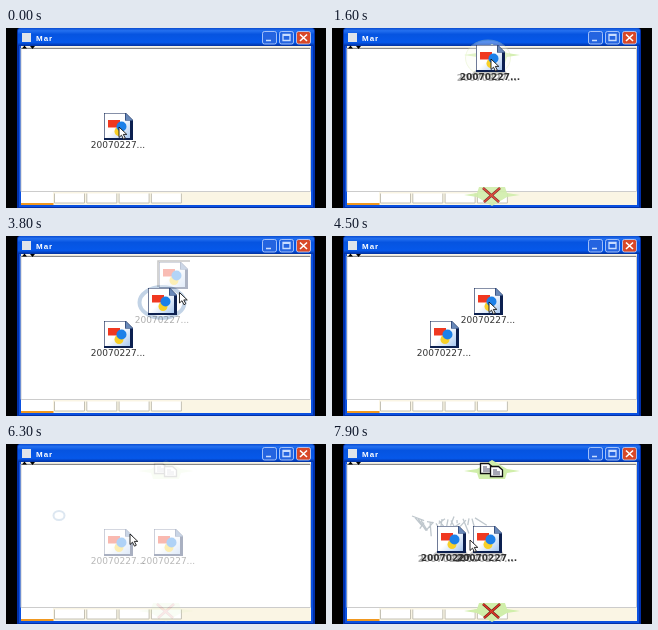
Animation of 320 by 180 pixels, one loop 8 s. Source, as an HTML page:

```html
<!DOCTYPE html>
<html lang="en">
<head>
<meta charset="utf-8">
<title>Drag and drop</title>
<style>
html, body { margin: 0; height: 100%; overflow: hidden; background: #000; }
svg { display: block; width: 100vw; height: 100vh; }
.label { font: 9px "DejaVu Sans", sans-serif; text-anchor: middle; fill: #333; }
.drag .label { font-weight: bold; }
.shadow { opacity: 0; }
.drag .shadow { opacity: .4; }
</style>
</head>
<body>
<svg viewBox="0 0 320 180">
  <defs>
    <linearGradient id="bar" x2="0" y2="1">
      <stop offset="0" stop-color="#0a4cd0"/>
      <stop offset=".15" stop-color="#2470f0"/>
      <stop offset=".35" stop-color="#0654e0"/>
      <stop offset=".8" stop-color="#0658ea"/>
      <stop offset="1" stop-color="#0230a0"/>
    </linearGradient>
    <linearGradient id="paper" x2="1" y2="1">
      <stop offset=".5" stop-color="#fff"/>
      <stop offset="1" stop-color="#a8c8f0"/>
    </linearGradient>
    <g id="file">
      <path d="M98 85h22l7 7v20H98z" fill="#0c2050"/>
      <path d="M98.6 85.6h20.4v7h5v17.400H98.600z" fill="url(#paper)"/>
      <path d="M119.500 85l7.500 7.500h-7.500z" fill="#6888b8"/>
      <circle cx="113" cy="103.500" r="4.500" fill="#f8d028"/>
      <path d="M102 92h12v7.500h-12z" fill="#f03820"/>
      <circle cx="115.500" cy="98.500" r="5" fill="#1c80e8"/>
    </g>
    <g id="page">
      <path d="M.5.5h8l4 3.500v6.500H.5z" fill="#fff" stroke="#111" stroke-width="1.300"/>
      <path d="M3 4h4M3 6h7M3 8h7" stroke="#224" stroke-width=".8"/>
    </g>
    <path id="arrow" d="M160 16l15 9 13 2-13 2-2 6h-26l-2-6-13-2 13-2z" fill="#d0eeaa"/>
    <path id="cross" d="M151 160l16 14m1-14l-16 14"/>
  </defs>

  <path d="M11 180V3q0-3 3-3h292q3 0 3 3v177z" fill="#0230a8"/>
  <path d="M13 18h294v161H13z" fill="#0a50e0"/>
  <path d="M12 18V3q0-3 3-3h290q3 0 3 3v15z" fill="url(#bar)"/>
  <rect x="16" y="5" width="9" height="9" fill="#dfe4ea"/>
  <text x="30" y="12.500" fill="#fff" font-family="Liberation Sans, sans-serif" font-size="8" font-weight="bold" letter-spacing="1">Mar</text>
  <g stroke="#c4d8ff" stroke-width=".8" fill="#2464e0">
    <rect x="256.500" y="3.500" width="14" height="12.500" rx="2"/>
    <rect x="273.500" y="3.500" width="14" height="12.500" rx="2"/>
    <rect x="290.500" y="3.500" width="14" height="12.500" rx="2" fill="#d84828"/>
  </g>
  <path d="M260 12.500h5M277 6.500h7v6h-7zM277 7.300h7" fill="none" stroke="#c8dcff" stroke-width="1.300"/>
  <path d="M294 6.500l7 6.500m0-6.500l-7 6.500" stroke="#fff" stroke-width="1.600"/>
  <path d="M15 18h290v159H15z" fill="#faf5e4"/>
  <path d="M15 20h289.500v143.500H15z" fill="#fff" stroke="#ccc"/>
  <path d="M15 20.500h289" stroke="#888"/>
  <path d="M16 20.500l2.500-3 2.500 3zM24 18h5l-2.500 3z"/>
  <g id="tabs" fill="#fff" stroke="#c4c1b4"></g>
  <path d="M15 164h32v12H15z" fill="#fff"/>
  <path d="M15 176h32.500" stroke="#f09820" stroke-width="2"/>

  <g id="guides">
    <use href="#arrow"/>
    <use href="#arrow" transform="matrix(1 0 0 -1 0 194)"/>
    <use href="#page" x="148" y="19"/>
    <use href="#page" x="158" y="22"/>
    <use href="#cross" stroke="#701818" stroke-width="2.600"/>
    <use href="#cross" stroke="#e03828" stroke-width="1.400"/>
  </g>
  <path id="trail" fill="none" stroke="#a4b0b8" stroke-width="1.300"/>
  <ellipse id="halo" fill="#fbfdf2" stroke="#d4e8a4" rx="22.500" ry="18"/>
  <ellipse id="ring" fill="none" stroke="#bccfe4"/>
  <g id="ghost" transform="translate(55 -59)">
    <path d="M97 110V84h32" fill="none" stroke="#555" stroke-width="1.500"/>
    <use href="#file"/>
  </g>
  <g id="first"></g>
  <g id="second"></g>
  <path id="cursor" d="M0 0v10.500l2.500-2.300 2 4 1.800-1-2-3.800h3.500z" fill="#fff" stroke="#111" stroke-width=".9"/>
</svg>
<script>
const LOOP = 8000, STEP = 100;
const $ = id => document.getElementById(id);
const set = (id, attrs) => Object.entries(attrs).forEach(([k, v]) => $(id).setAttribute(k, v));

for (let i = 0; i < 4; i++) {
  $("tabs").innerHTML += `<path d="M${48.5 + i * 32.3} 165.500v9.500h30v-9.500"/>`;
}
for (const id of ["first", "second"]) {
  $(id).innerHTML = `
    <text class="label shadow" x="109" y="121">20070227...</text>
    <path class="shadow" d="M92 115l6-5h29l3 5z" fill="#777"/>
    <use href="#file"/>
    <text class="label" x="112" y="120">20070227...</text>`;
}

// Scribble left behind the group drag
let seed = 7;
const random = () => (seed = seed * 16807 % 2147483647) / 2147483647;
const strokes = Array.from({ length: 22 }, (_, i) =>
  `M${80 + i * 3} ${72 + random() * 8}l${random() * 24 - 10} ${random() * 16}`);
$("trail").setAttribute("d", strokes.join(""));

const ramp = (t, from, to) => Math.min(1, Math.max(0, (t - from) / (to - from)));
const pulse = (t, on, off, rise = 200, fall = 300) =>
  ramp(t, on, on + rise) * (1 - ramp(t, off, off + fall));

// Offsets from the first icon's resting place
const HOME = [0, 0], COPY = [46, -68], PASTE = [44, -33], BESIDE = [50, 0];
const GRIP = [113, 99], LASSO = [-59, -28];

// Each move is [start, end, target, x power, y power].
const travel = (t, start, ...moves) => moves.reduce(([x, y], [from, to, target, px = 1, py = 1]) => {
  const p = ramp(t, from, to);
  return [x + (target[0] - x) * p ** px, y + (target[1] - y) * p ** py];
}, start);

const LIFT = [300, 1400, COPY, 1.8, 4], PLACE = [4500, 5200, BESIDE];

function draw(t) {
  const first = travel(t, HOME, LIFT, [1800, 2200, HOME], [7300, 7900, [7, -3]]);
  const second = travel(t, [55, -60], [3600, 3800, PASTE], PLACE, [7300, 7900, [43, -3]]);
  const [cx, cy] = travel(t, HOME, LIFT, [1800, 2300, [84, -56]], [2800, 4500, PASTE], PLACE,
    [5500, 5950, LASSO], [5950, 6300, [11, -9]], [6300, 7300, [25, 0]], [7300, 7900, [25, -3]]);
  set("cursor", { transform: `translate(${cx + GRIP[0]} ${cy + GRIP[1]})` });

  const blink = 1 - .65 * pulse(t, 5900, 6300, 400, 400);
  set("first", { transform: `translate(${first})`, opacity: blink });
  set("second", { transform: `translate(${second})`, opacity: blink * ramp(t, 3600, 3800) });
  $("second").lastElementChild.setAttribute("opacity", ramp(t, 3600, 4100));

  const copying = t > 300 && t < 1800, placing = t > 4500 && t < 5500, grouping = t > 7300;
  $("first").classList.toggle("drag", copying || grouping);
  $("second").classList.toggle("drag", placing || grouping);

  set("guides", { opacity: pulse(t, 300, 1500, 300, 900) + pulse(t, 4600, 5500, 300, 900) + ramp(t, 7300, 7600) });
  set("trail", { opacity: .7 * ramp(t, 7400, 7700) });
  set("ghost", { opacity: .5 * pulse(t, 3600, 3700, 100, 300) });

  const [hx, hy] = t < 3000 ? first : second;
  set("halo", { cx: hx + 110, cy: hy + 98, opacity: pulse(t, 300, 1400) + pulse(t, 4600, 5400) });

  const [rx, ry] = t < 5000 ? PASTE : LASSO;
  const grow = pulse(t, 3600, 5000);
  set("ring", {
    cx: rx + 112, cy: ry + 99.5, rx: 5.5 + grow * 17, ry: 4.5 + grow * 11,
    "stroke-width": 2 + grow * 2,
    opacity: .9 * pulse(t, 2000, 3800, 200, 400) + .5 * pulse(t, 5900, 6300)
  });
}

function frame(now) {
  draw(Math.floor(now % LOOP / STEP) * STEP);
  requestAnimationFrame(frame);
}
frame(performance.now());
</script>
</body>
</html>
```
